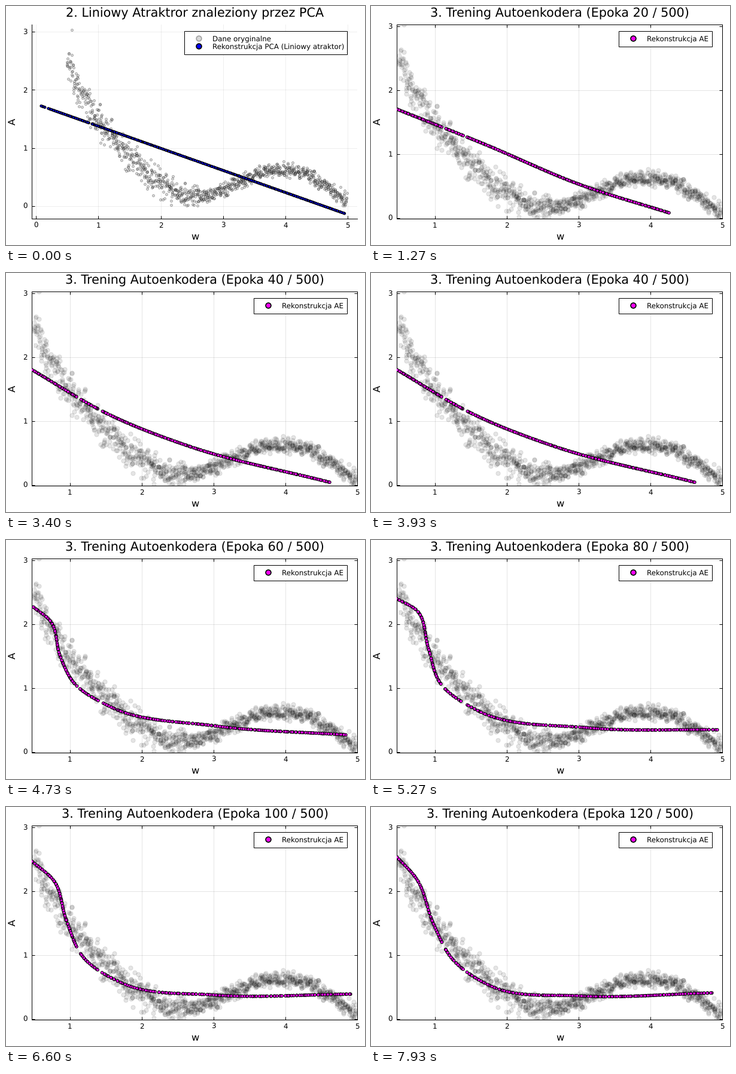
A matplotlib script for the animation above (8000 ms loop, 600x400 px).

```python
import numpy as np
import matplotlib.pyplot as plt
from matplotlib.animation import FuncAnimation
from matplotlib.patches import Rectangle
from matplotlib.transforms import Affine2D

W, H, DPI = 600, 400, 100
PT = 72 / DPI                      # points per pixel
LOOP, STEP = 8000, 20              # ms
FIRST, HOLD = 1270, 1332           # ms until the training starts, ms per epoch shown
LEFT, RIGHT, TOP, BOTTOM = 43.25, 587.25, 30.75, 355.75
SMALL, MEDIUM, LARGE = 11.85, 16.3, 20.75

plt.rcParams.update({"font.family": "DejaVu Sans", "text.hinting": "none"})
fig = plt.figure(figsize=(W / DPI, H / DPI), dpi=DPI, facecolor="white")
pixels = Affine2D().scale(1 / W, -1 / H).translate(0, 1) + fig.transFigure
rng = np.random.default_rng(11)

# Key points (w, A) of the learned curve, one row for every 20 epochs
CURVES = [
    [(.46, 1.707), (1.69, 1.155), (3.025, .52), (4.26, .08)],
    [(.46, 1.81), (1.567, 1.09), (2.667, .603), (4.617, .042)],
    [(.492, 2.268), (.725, 2.053), (.867, 1.492), (1.05, 1.09),
     (1.567, .706), (3.025, .407), (4.842, .267)],
    [(.467, 2.40), (.75, 2.212), (.908, 1.632), (1.08, 1.07),
     (1.608, .641), (3.108, .379), (4.933, .346)],
    [(.475, 2.465), (.775, 2.166), (.95, 1.55), (1.192, .959),
     (1.75, .55), (3.0, .375), (4.908, .388)],
    [(.475, 2.53), (.74, 2.20), (.983, 1.483), (1.25, .93),
     (1.8, .505), (3.025, .36), (4.858, .407)],
]


def make_data(streaks=128, per_streak=8):
    """Noisy samples of a wavy hyperbola, in short, slightly leaning streaks."""
    w = np.linspace(.51, 4.97, streaks)[:, None]
    mean = .02 + 1.15 / w + .32 * np.sin(2 * w - .1)
    spread = .055 + .065 / (1 + np.exp(3 * (w - 2.4)))
    noise = rng.normal(0, 1, (streaks, per_streak)) + rng.normal(0, .35, (streaks, 1))
    dy = spread * np.clip(noise, -2.4, 2.4)
    x = w + .12 * dy + rng.normal(0, .008, dy.shape)
    x = np.append(np.clip(x, .472, 5.0), .571)
    y = np.append(np.clip(mean + dy, .01, 2.82), 3.03)
    return x, y


def smooth(knots, count):
    """Evenly spread, slightly jittered samples on a Hermite curve."""
    knots = np.array(knots)
    steps = np.hypot(*np.diff(knots, axis=0).T)
    s = np.concatenate([[0], np.cumsum(steps)])
    slope = np.gradient(knots, s, axis=0)
    at = np.linspace(0, s[-1], count)
    at[1:-1] += rng.uniform(-.6, .6, count - 2) * at[1]
    k = np.clip(np.searchsorted(s, at) - 1, 0, len(steps) - 1)
    h = steps[k][:, None]
    u = (at[:, None] - s[k][:, None]) / h
    return ((1 + 2 * u) * (1 - u) ** 2 * knots[k] + u * (1 - u) ** 2 * h * slope[k]
            + u * u * (3 - 2 * u) * knots[k + 1] + u * u * (u - 1) * h * slope[k + 1])


def sample(knots, count, gaps):
    """Curve samples in random drawing order, with small gaps at some w."""
    points = smooth(knots, count)
    far = np.abs(points[:, :1] - gaps).min(axis=1) > .022
    return rng.permutation(points[far]).T


def dots(ax, x, y, size, face, edge, width, **kw):
    return ax.scatter(x, y, s=(size * PT) ** 2, facecolors=face,
                      edgecolors=edge, linewidths=width * PT, **kw)


def write(ax, x, y, text, size, **kw):
    return ax.text(x, y, text, fontsize=size * PT, transform=pixels,
                   va="baseline", **kw)


def make_axes(xlim, ylim, xticks, yticks, boxed):
    ax = fig.add_axes([LEFT / W, 1 - BOTTOM / H, (RIGHT - LEFT) / W, (BOTTOM - TOP) / H])
    ax.set(xlim=xlim, ylim=ylim, xticks=xticks, yticks=yticks)
    ax.set_axisbelow(True)
    ax.grid(color="black", alpha=.1 if boxed else .065, linewidth=PT)
    ax.tick_params(direction="in", length=5 * PT, width=PT, top=boxed, right=boxed,
                   labelbottom=False, labelleft=False)
    for side, spine in ax.spines.items():
        spine.set_linewidth(PT)
        spine.set_visible(boxed or side in ("left", "bottom"))
    for v in xticks:
        x = np.interp(v, xlim, (LEFT, RIGHT))
        write(ax, x, 371.2, str(v), SMALL, ha="center")
    for v in yticks:
        y = np.interp(v, ylim, (BOTTOM, TOP))
        write(ax, 35.8, y + 4.4, str(v), SMALL, ha="right")
    middle = (LEFT + RIGHT) / 2 + .5
    write(ax, middle, 390.8, "w", MEDIUM, ha="center")
    write(ax, 16, (TOP + BOTTOM) / 2, "A", MEDIUM, ha="center",
          rotation=90, rotation_mode="anchor")
    title = write(ax, middle, 18.8, "", LARGE, ha="center")
    return ax, title


def add_legend(ax, left, bottom, entries):
    ax.add_patch(Rectangle((left, 41.75), 570.25 - left, bottom - 41.75,
                           facecolor="white", edgecolor="black", linewidth=PT,
                           transform=pixels, clip_on=False, zorder=5))
    for i, (text, face, edge) in enumerate(entries):
        y = 54.2 + 13.2 * i
        dots(ax, [left + 24], [y], 8.8, [face], [edge], 1.7,
             transform=pixels, clip_on=False, zorder=6)
        write(ax, left + 46.4, y + 4.3, text, SMALL, zorder=6)


data_x, data_y = make_data()
GREY, GREY_EDGE = (.5, .5, .5, .3), (0, 0, 0, .3)

pca_ax, pca_title = make_axes((-.067, 5.153), (-.216, 3.128), range(6), range(4), False)
pca_title.set_text("2. Liniowy Atraktror znaleziony przez PCA")
dots(pca_ax, data_x, data_y, 4, GREY, GREY_EDGE, .9, zorder=2)
line_x, line_y = sample([(.082, 1.723), (4.947, -.128)], 380, [.17, .87])
dots(pca_ax, line_x, line_y, 3.7, ["blue"] * len(line_x), "black", 1.1, zorder=3)
add_legend(pca_ax, 298.25, 80.75, [
    ("Dane oryginalne", GREY, GREY_EDGE),
    ("Rekonstrukcja PCA (Liniowy atraktor)", "blue", "black")])

ae_ax, ae_title = make_axes((.471, 5.004), (-.01, 3.03), range(1, 6), range(4), True)
dots(ae_ax, data_x, data_y, 7.2, (0, 0, 0, .1), (0, 0, 0, .11), .9, zorder=2)
add_legend(ae_ax, 414.25, 67.75, [("Rekonstrukcja AE", "magenta", "black")])
fits = []
for knots in CURVES:
    x, y = sample(knots, 220, [1.12, 1.42])
    fits.append(dots(ae_ax, x, y, 4.7, ["magenta"] * len(x), "black", 1.05, zorder=3))


def update(i):
    # The training picture jumps ahead by 20 epochs at every hold
    stage = int((i * STEP + STEP / 2 - FIRST) // HOLD) + 1
    pca_ax.set_visible(stage == 0)
    ae_ax.set_visible(stage > 0)
    ae_title.set_text(f"3. Trening Autoenkodera (Epoka {20 * stage} / 500)")
    for n, fit in enumerate(fits, start=1):
        fit.set_visible(n == stage)
    return []


anim = FuncAnimation(fig, update, frames=LOOP // STEP, interval=STEP,
                     repeat=True, repeat_delay=0, blit=False)
plt.show()
```
